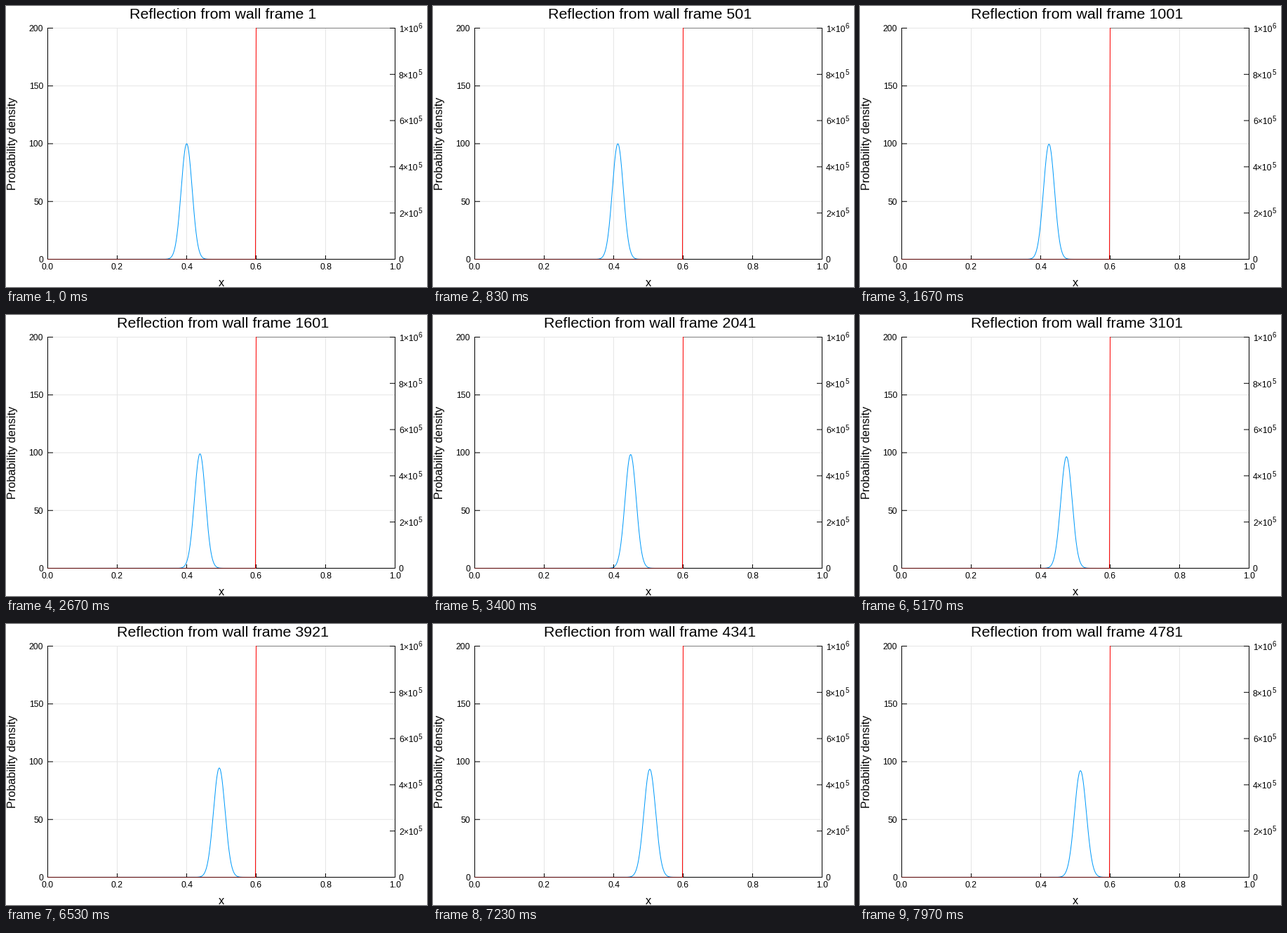
A matplotlib script that plays this animation: 600 by 400 pixels, repeating every 8 s.

```python
import numpy as np
import matplotlib.pyplot as plt
from matplotlib.animation import FuncAnimation

W, H, DPI = 600, 400, 100
TICK_MS, LOOP = 10, 8000
STEPS = 20                                   # solver steps per picture
LEFT, RIGHT, TOP, BOTTOM = 59.5, 554.5, 31.5, 360.5
PT = 72 / DPI                                # points per pixel

plt.rcParams["font.family"] = "Liberation Sans"
fig = plt.figure(figsize=(W / DPI, H / DPI), dpi=DPI, facecolor="white")
ax = fig.add_axes([0, 0, 1, 1])
ax.set_xlim(0, W)
ax.set_ylim(H, 0)
ax.axis("off")


def px(x):
    return LEFT + x * (RIGHT - LEFT)


def py(density):
    return BOTTOM - density / 200 * (BOTTOM - TOP)


def line(xs, ys, color, width=1.0, **kw):
    return ax.plot(xs, ys, color=color, lw=width * PT, snap=False, **kw)[0]


def segments(parts, color, zorder):
    """Draw separate (x0, y0, x1, y1) strokes as one artist."""
    xs, ys = [], []
    for x0, y0, x1, y1 in parts:
        xs += [x0, x1, np.nan]
        ys += [y0, y1, np.nan]
    line(xs, ys, color, zorder=zorder)


def label(x, y, s, size, ha="center", **kw):
    return ax.text(x, y, s, fontsize=size * PT, ha=ha, va="baseline", **kw)


grid_lines = []
strokes = [(LEFT, TOP, LEFT, BOTTOM), (RIGHT, TOP, RIGHT, BOTTOM),
           (LEFT, BOTTOM, RIGHT, BOTTOM)]

for i in range(6):
    x = px(i / 5)
    if 0 < i < 5:
        grid_lines.append((x, TOP, x, BOTTOM))
    strokes.append((x, BOTTOM, x, BOTTOM - 5))
    label(x, 375, f"{i / 5:.1f}", 12.2)

for v in range(0, 201, 50):
    y = py(v)
    if v:
        grid_lines.append((LEFT, y, RIGHT, y))
    strokes.append((LEFT, y, LEFT + 7, y))
    label(53, y + 4.3, str(v), 12.2, ha="right")

for i in range(6):
    y = py(40 * i)
    strokes.append((RIGHT - 7, y, RIGHT, y))
    mantissa, power = (1, 6) if i == 5 else (2 * i, 5)
    if i == 0:
        label(560, y + 4.3, "0", 12.2, ha="left")
    else:
        label(560, y + 5.3, f"{mantissa}×10", 12.2, ha="left")
        label(587.5, y + 0.6, str(power), 9.8, ha="left")

segments(grid_lines, "#e5e5e5", 1)
segments(strokes, "black", 4)

# potential wall
line([px(0.6), RIGHT], [TOP, TOP], "#7f7f7f", zorder=3)
line([LEFT, px(0.598)], [BOTTOM, BOTTOM], "red", alpha=0.35, zorder=5)
line([px(0.598), px(0.6)], [BOTTOM, TOP], "red", zorder=5)

label(307, 399, "x", 16.4)
label(14, 195.5, "Probability density", 16.3, rotation=90,
      rotation_mode="anchor")
title = label(309.2, 18.4, "", 21.5)

# wave packet on a lattice, propagated in momentum space
DX, DT = 1e-3, 5e-8
grid = np.arange(1000) * DX
packet = np.fft.fft(10 * np.exp(-1000 * (grid - 0.4) ** 2 + 500j * grid))
energy = (1 - np.cos(2 * np.pi * np.fft.fftfreq(grid.size))) / DX ** 2
curve = line(px(grid), np.full(grid.size, BOTTOM), "#009afa", zorder=3)


def draw(tick):
    # 30 pictures per second, each start rounded to the nearest 10 ms
    step = (3 * tick + 1) // 10 * STEPS
    psi = np.fft.ifft(packet * np.exp(-1j * energy * step * DT))
    curve.set_ydata(py(np.abs(psi) ** 2))
    title.set_text(f"Reflection from wall frame {step + 1}")
    return curve, title


anim = FuncAnimation(fig, draw, frames=LOOP // TICK_MS, interval=TICK_MS,
                     init_func=lambda: draw(0), repeat=True, repeat_delay=0)
plt.show()
```
